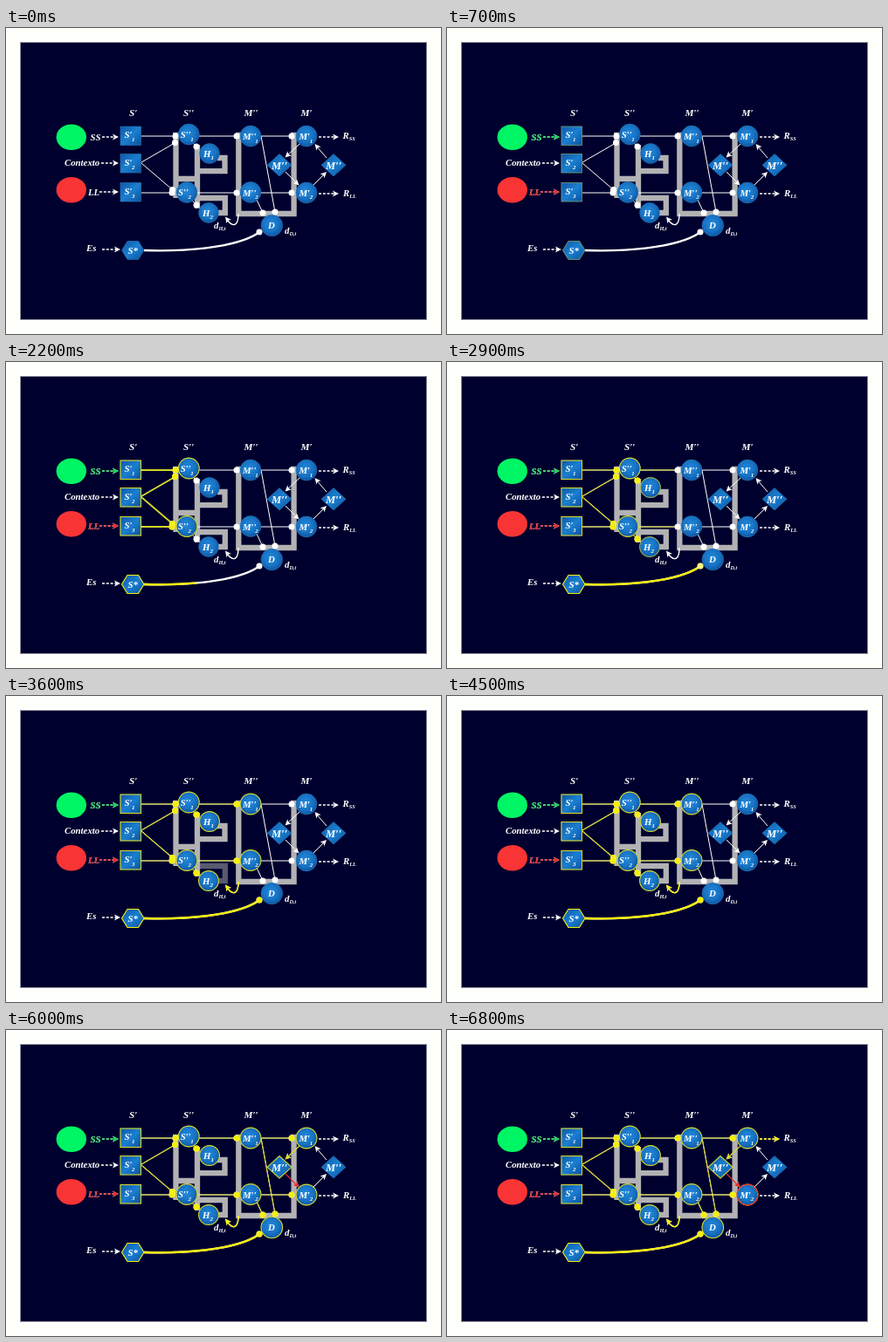
These frames come from a looping animation (498 by 351 pixels, 6900 ms). An HTML page:

```html
<!DOCTYPE html>
<html lang="es">
<head>
<meta charset="utf-8">
<title>Diagrama de activación</title>
<style>
  html, body { margin: 0; width: 100%; height: 100%; overflow: hidden; background: #fdfffb; }
  svg { display: block; width: 498px; height: 351px; }
  text { font: italic bold 10.8px "Liberation Serif", "Times New Roman", serif; fill: #fff; }
  .sub { font-size: 7px; }
  .tiny { font-size: 6.2px; }
</style>
</head>
<body>
<svg id="stage" viewBox="0 0 498 351">
  <defs>
    <linearGradient id="box" x1="0" y1="0" x2="1" y2="1">
      <stop offset="0" stop-color="#0c59a8"/>
      <stop offset=".5" stop-color="#1b7fd0"/>
      <stop offset="1" stop-color="#0b529c"/>
    </linearGradient>
    <radialGradient id="ball" cx=".45" cy=".42" r=".6">
      <stop offset="0" stop-color="#2389da"/>
      <stop offset=".6" stop-color="#1873c4"/>
      <stop offset="1" stop-color="#0c56a2"/>
    </radialGradient>
  </defs>
  <rect x="16.5" y="16.5" width="465" height="318" fill="#00002e" stroke="#8c8c9c"/>
</svg>
<script>
const LOOP = 6900, STEP = 100;
const YELLOW = '#f4ee0a', SOFT = '#d6d628', GREEN = '#14d856', RED = '#e62a2a', GRAY = '#b2b2b4';
const stage = document.getElementById('stage');
const cues = [];

function add(tag, attrs, parent = stage) {
  const node = document.createElementNS('http://www.w3.org/2000/svg', tag);
  for (const key in attrs) node.setAttribute(key, attrs[key]);
  parent.appendChild(node);
  return node;
}
const pipes = add('g', { fill: 'none', stroke: GRAY, 'stroke-width': 6.3 });
const lines = add('g', { fill: 'none' });
const nodes = add('g', {});
const tops = add('g', {});
const words = add('g', {});

// A cue maps the loop time to 0..1 between start and end.
function cue(start, end, draw) { cues.push({ start, end, draw }); }
function fade(node, start, end = start + 200) {
  cue(start, end, p => node.setAttribute('opacity', p));
}
function wipe(node, start, end) {
  node.setAttribute('pathLength', 1);
  node.setAttribute('stroke-dasharray', '1 1');
  cue(start, end, p => {
    node.setAttribute('stroke-dashoffset', 1 - p);
    node.setAttribute('opacity', p > 0 ? 1 : 0);
  });
}

function dot(x, y, lit) {
  const r = 3.5;
  add('circle', { cx: x, cy: y, r, fill: '#fff' }, tops);
  fade(add('circle', { cx: x, cy: y, r, fill: YELLOW }, tops), lit);
}
function head(x, y, angle, color) {
  return add('path', {
    d: 'M0 0L-7 -3.4L-5.2 0L-7 3.4Z', fill: color,
    transform: `translate(${x} ${y}) rotate(${angle})`
  }, tops);
}
function link(d, start, end, { width = 1, color = SOFT, tip, arrow, swell } = {}) {
  add('path', { d, stroke: '#fff', 'stroke-width': width }, lines);
  if (start) {
    const glow = add('path', { d, stroke: color, 'stroke-width': width + .1 }, lines);
    wipe(glow, start, end);
    if (swell) cue(end + 200, end + 1400, p =>
      glow.setAttribute('stroke-width', width + .1 + .7 * Math.sin(Math.PI * p)));
  }
  if (tip) dot(...tip, end + 100);
  if (arrow) {
    head(...arrow, '#fff');
    if (start) fade(head(...arrow, color), end - 100, end);
  }
}
function dashed(x1, x2, y, color, start) {
  const draw = tint => {
    const g = add('g', {}, tops);
    add('path', { d: `M${x1} ${y}H${x2 - 5}`, stroke: tint, 'stroke-width': 1.5, 'stroke-dasharray': '3 1.8' }, g);
    g.appendChild(head(x2, y, 0, tint));
  	return g;
  };
  draw('#fff');
  if (color) fade(draw(color), start, start + 400);
}
function shape(tag, attrs, fill, lit, color = SOFT) {
  add(tag, { ...attrs, fill: `url(#${fill})`, stroke: '#2b78b8', 'stroke-width': .6 }, nodes);
  if (lit) fade(add(tag, { ...attrs, fill: 'none', stroke: color, 'stroke-width': 1.1 }, nodes), lit, lit + 300);
}
function ball(cx, cy, r, lit) { shape('circle', { cx, cy, r }, 'ball', lit); }
function label(x, y, main, sub = '', { cls = 'sub', dx = -.5, dy = 3.5, size } = {}) {
  const t = add('text', { x, y }, words);
  if (size) t.style.fontSize = size + 'px';
  t.textContent = main;
  if (sub) add('tspan', { class: cls, dx, dy }, t).textContent = sub;
  return t;
}
function tintLabel(x, y, text, color, start) {
  label(x, y, text);
  const t = label(x, y, text);
  t.style.fill = color;
  fade(t, start, start + 400);
}

// Grey channels
add('path', { d: 'M191 123H194.5V195M194 173H218M219 134V207M219 164.2H250.5V149H242' }, pipes);
const loopPipe = add('path', { d: 'M222 195H250.8V212H243' }, pipes);
add('path', { d: 'M270 123H266.3V213H329.6V123H326' }, pipes);
cue(3200, 4300, p => {
  loopPipe.setAttribute('opacity', 1 - .5 * Math.min(1, 2.8 * Math.min(p, 1 - p)));
});

// Stimuli
add('ellipse', { cx: 74.8, cy: 125.2, rx: 17.2, ry: 14.8, fill: '#00f564' }, nodes);
add('ellipse', { cx: 74.8, cy: 185.8, rx: 17.2, ry: 14.8, fill: '#f93434' }, nodes);
dashed(110, 129, 125, GREEN, 200);
dashed(109, 129, 155);
dashed(107, 129, 188, RED, 200);
dashed(110, 131, 254);
dashed(358, 381, 125, YELLOW, 6200);
dashed(358, 381, 190);

// Sensory links
link('M155 124H194', 900, 1400, { tip: [194, 124], swell: true });
link('M155 154L193 132', 900, 1400, { tip: [193.5, 131.5], swell: true });
link('M155 155L190 185', 900, 1400, { tip: [190.5, 185.5], swell: true });
link('M155 189H190', 900, 1400, { tip: [190, 189], swell: true });
link('M158 255C200 256.5 262 253 289 235', 1800, 2700, { width: 2.3, color: YELLOW, tip: [290, 234] });
link('M213 131L218 136', 2300, 2600, { tip: [218, 136] });
link('M213 198L218 203', 2300, 2600, { tip: [218, 203] });
link('M221 124H264', 2300, 2900, { tip: [264, 124] });
link('M219 189H264', 2300, 2900, { tip: [264, 189] });
link('M266 213C266 226 261 230 253 220', 3000, 3400, { width: 1.4, color: YELLOW, arrow: [251, 216.5, -127] });

// Motor links
link('M291 124H327', 4600, 5000, { tip: [327, 124] });
link('M291 189H327', 4600, 5000, { tip: [327, 189] });
link('M292 124L308 211', 4600, 5000, { tip: [308, 211] });
link('M287 197L294 212', 4600, 5000, { tip: [294, 212] });
link('M336 133L321 147', 5000, 5300, { arrow: [319.5, 148.5, 137] });
link('M320 165L334 179', 5600, 6000, { color: RED, arrow: [335.5, 180.5, 45] });
link('M352 180L365 167', 0, 0, { arrow: [367, 165, -45] });
link('M367 149L355 135', 0, 0, { arrow: [353.5, 133, -130] });

// Nodes
for (const y of [113, 144.5, 177.5])
  shape('rect', { x: 131, y, width: 23.5, height: 21.5 }, 'box', 600);
shape('path', { d: 'M132.5 255L139 244.5H151.5L158 255L151.5 265.5H139Z' }, 'box', 600, YELLOW);
ball(209.3, 122, 11.9, 1600);
ball(207, 188.5, 11.9, 1600);
ball(233, 144, 11.4, 2700);
ball(232, 212, 11.4, 2700);
ball(280, 124, 11.9, 2900);
ball(280, 188.5, 11.9, 2900);
ball(344, 124, 11.9, 5000);
ball(344, 189, 11.9, 5000);
ball(304.3, 226.5, 12.3, 5000);
fade(add('circle', { cx: 344, cy: 189, r: 11.9, fill: 'none', stroke: RED, 'stroke-width': 1.2 }, nodes), 6000);
for (const [x, lit] of [[313, 5100], [375, 0]])
  shape('path', { d: `M${x - 14} 157.3L${x} 144.5L${x + 14} 157.3L${x} 170Z` }, 'box', lit);

// Text
for (const [x, text] of [[141, 'S′'], [203, 'S′′'], [272.5, 'M′′'], [337.5, 'M′']])
  label(x, 100.7, text, '', { size: 11.2 });
[[126, 1], [158, 2], [191, 3]].forEach(([y, n]) => label(135.5, y, 'S′', n));
label(199.7, 126, 'S′′', 1);
label(197, 192, 'S′′', 2);
label(226, 147.5, 'H', 1, { dx: 0, dy: 3 });
label(225, 215.5, 'H', 2, { dx: 0, dy: 3 });
label(271, 128, 'M′′', 1, { dx: -1.5 });
label(271, 192.5, 'M′′', 2, { dx: -1.5 });
label(335.5, 128, 'M′', 1);
label(335.5, 192.5, 'M′', 2);
label(300, 230, 'D');
label(304, 161.5, 'M′′', '', { size: 12.6 });
label(366, 161.5, 'M′′', '', { size: 12.6 });
label(139.5, 259, 'S*');
tintLabel(96.5, 128.8, 'SS', GREEN, 200);
tintLabel(94, 191.8, 'LL', RED, 200);
label(67, 158.3, 'Contexto');
label(92, 256.3, 'Es');
const small = { cls: 'tiny', dx: 0, dy: 2 };
label(385.5, 127, 'R', 'SS', small);
label(386, 192.5, 'R', 'LL', small);
label(238, 229.5, 'd', 'H,t', small);
label(319, 236, 'd', 'D,t', small);

function render(now) {
  const t = Math.floor((now % LOOP) / STEP) * STEP;
  for (const { start, end, draw } of cues)
    draw(Math.min(1, Math.max(0, (t - start) / (end - start))));
}
const origin = performance.now();
function tick() {
  render(performance.now() - origin);
  requestAnimationFrame(tick);
}
tick();
</script>
</body>
</html>
```
